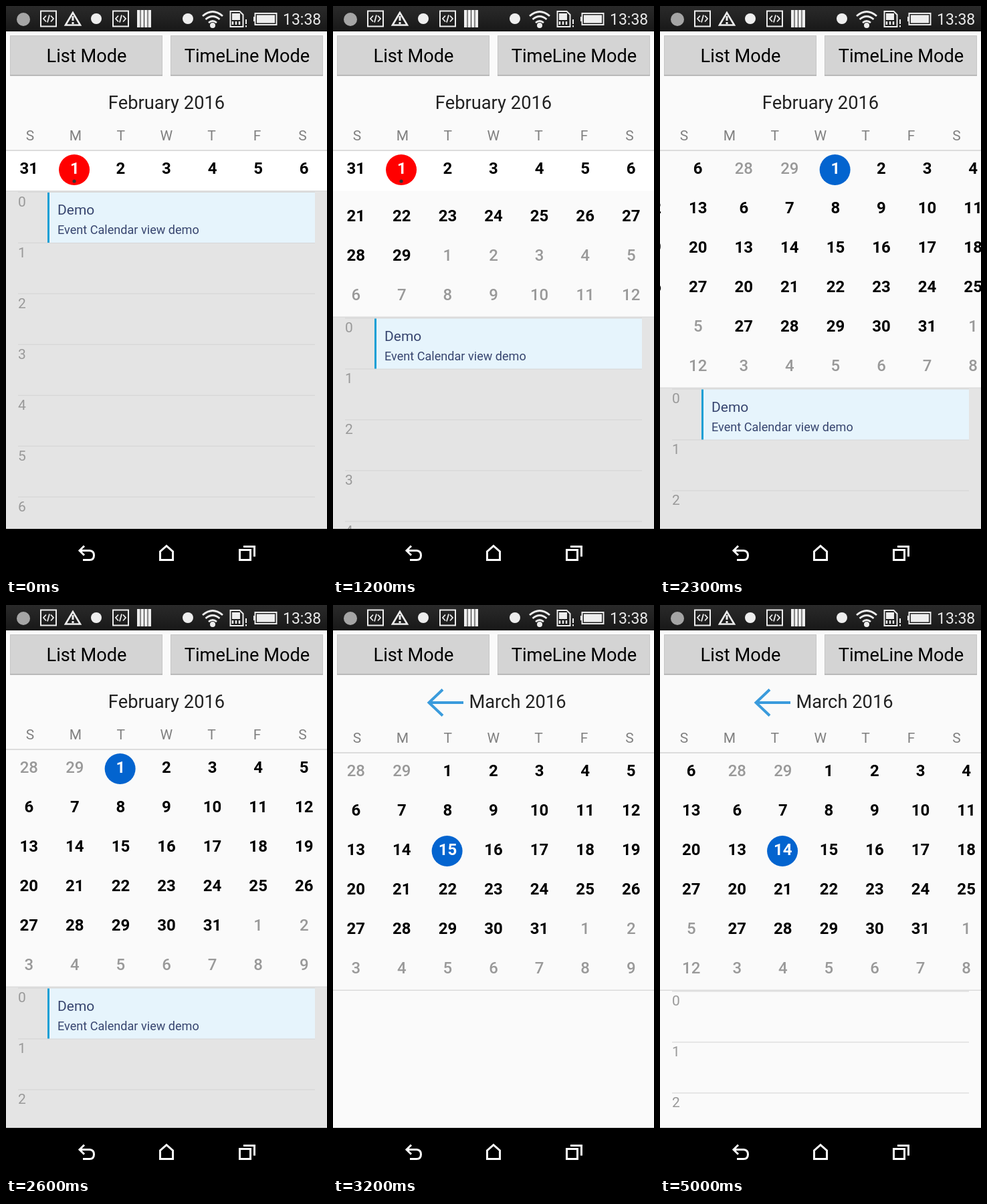
Write an HTML page with a canvas that moves like this. It is 480 px wide and 854 px high and loops after 5.1 s.

```html
<!DOCTYPE html>
<html lang="en">
<head>
<meta charset="utf-8">
<title>Calendar view</title>
<style>
html, body { margin: 0; height: 100%; overflow: hidden; background: #fafafa; }
canvas { display: block; }
</style>
</head>
<body>
<canvas id="stage" width="480" height="854"></canvas>
<script>
const ctx = document.getElementById('stage').getContext('2d');
const LOOP = 5100, STEP = 100, WIDTH = 480, FOOT = 782, COLUMN = WIDTH / 7, ROW = 59, HOUR = 76;
const PAPER = '#fafafa', RULE = '#dcdcdc', WHITE = '#fff', TODAY = '#f00', PICKED = '#0364cf';
const FEBRUARY = { lead: 1, length: 29, before: 31 };
const MARCH = { lead: 2, length: 31, before: 29 };

// Keys are [time, value]; linear in between.
function track(time, keys) {
  const next = keys.findIndex(key => key[0] > time);
  if (next === 0) return keys[0][1];
  if (next < 0) return keys[keys.length - 1][1];
  const [t0, v0] = keys[next - 1], [t1, v1] = keys[next];
  return v0 + (v1 - v0) * (time - t0) / (t1 - t0);
}
const expand = t => track(t, [[900, 0], [1000, 35.5], [1300, 265], [1400, 294.5]]);
const monthShift = t => track(t, [[2000, 480], [2100, 435], [2200, 250], [2300, 91], [2400, 33],
  [2500, 8], [2600, 0], [4800, 0], [4900, 34], [5000, 81]]);

function box(x, y, w, h, color) {
  ctx.fillStyle = color;
  ctx.fillRect(x, y, w, h);
}
function disc(x, y, r, color) {
  ctx.fillStyle = color;
  ctx.beginPath();
  ctx.arc(x, y, r, 0, 7);
  ctx.fill();
}
function stroke(path, color, width) {
  ctx.strokeStyle = color;
  ctx.lineWidth = width;
  ctx.stroke(new Path2D(path));
}
function text(value, x, y, size, color, align = 'center', weight = 400) {
  ctx.font = `${weight} ${size}px Roboto, sans-serif`;
  ctx.textAlign = align;
  ctx.fillStyle = color;
  ctx.fillText(value, x, y);
}
function clipped(x, y, w, h, draw) {
  ctx.save();
  ctx.beginPath();
  ctx.rect(x, y, w, h);
  ctx.clip();
  draw();
  ctx.restore();
}

function statusBar() {
  const shade = ctx.createLinearGradient(0, 0, 0, 38);
  shade.addColorStop(0, '#2a2a2a');
  shade.addColorStop(1, '#181818');
  box(0, 0, WIDTH, 38, shade);
  disc(26, 20, 10, '#a5a5a5');
  for (const x of [52, 160]) {
    stroke(`M${x} 7.500h23v23h-23z`, '#eee', 2);
    stroke(`M${x + 8} 14.500l-4 4.500 4 4.500M${x + 15} 14.500l4 4.500-4 4.500M${x + 13} 13.500l-3 11`, '#eee', 1.8);
  }
  stroke('M100 10L89 28.500H111Z', '#eee', 2.6);
  stroke('M100 15v7M100 24v3', '#eee', 3);
  disc(135, 19, 8, '#eee');
  for (let i = 0; i < 4; i++) box(196 + i * 5.5, 6, 4.5, 26, '#eee');
  disc(272, 19, 8, '#eee');
  disc(309, 29, 4, '#eee');
  stroke('M294 15Q309 2 324 15M298.500 20Q309 11 319.500 20M303 25Q309 20 315 25', '#eee', 2.8);
  stroke('M335.500 8h14l5 5v18h-19z', '#eee', 2);
  box(338, 11, 12, 10, '#eee');
  stroke('M339 23v5M344 23v5M349 23v5', '#eee', 2.5);
  stroke('M359 20v7M359 29v2.500', '#eee', 2);
  stroke('M372.500 11h32v17h-32zM371 16v7', '#eee', 2);
  box(375, 13.5, 27, 12, '#eee');
  text('13:38', 414, 28, 23, '#e8e8e8', 'left');
}

function button(x, label, center) {
  box(x, 44, 228, 60.5, '#a9a9a9');
  box(x, 44, 228, 59, '#c6c6c6');
  box(x + 1, 45, 226, 58, '#d4d4d4');
  text(label, center, 84, 27.2, '#000');
}

function navBar() {
  box(0, FOOT, WIDTH, 72, '#000');
  stroke('M117 807.500L110 814.500L117 821.500M111 814.500H125Q131.500 815 131.500 821.500Q131.500 828.500 125 828.500H115', WHITE, 3);
  stroke('M230.500 828.500V816L240 807.500L249.500 816V828.500Z', WHITE, 3);
  stroke('M349.500 813.500h16v15h-16zM355 808.500h16.500v15', WHITE, 3);
}

function dayCell(value, column, y, color, mark) {
  const x = (column + .5) * COLUMN;
  if (mark) disc(x - .8, y + 3, 23, mark);
  if (mark === TODAY) disc(x - .8, y + 20, 2.6, '#333');
  text(value, x, y + 9, 24, mark ? WHITE : color, 'center', color === '#999' ? 500 : 600);
}

function monthPage(month, shift, top, selected, mark) {
  ctx.save();
  ctx.translate(shift, 0);
  for (let i = 0; i < 42; i++) {
    const day = i - month.lead + 1;
    const inside = day > 0 && day <= month.length;
    const label = day < 1 ? day + month.before : inside ? day : day - month.length;
    dayCell(label, i % 7, top + 26 + Math.floor(i / 7) * ROW, inside ? '#000' : '#999', day === selected && mark);
  }
  ctx.restore();
}

function hours(top, shift, busy) {
  ctx.save();
  ctx.translate(shift, 0);
  if (busy) box(0, top, WIDTH, FOOT - top, '#e4e4e4');
  for (let i = 0; i < 7; i++) {
    const y = top + i * HOUR;
    box(18, y + .7, 444, 1.3, busy ? '#d7d7d7' : RULE);
    text(i, 18, y + 22.5, 21, '#999', 'left');
  }
  if (busy) {
    box(62, top + 2, 400, 75, '#e6f4fc');
    box(62, top + 2, 3, 75, '#109fd5');
    text('Demo', 77, top + 35, 21, '#37456f', 'left');
    text('Event Calendar view demo', 77, top + 64, 18.1, '#37456f', 'left');
  }
  ctx.restore();
}

function agenda(t, top) {
  if (t < 2900) hours(top, track(t, [[2600, 0], [2700, -200], [2800, -400], [2900, -480]]), true);
  else if (t >= 4300 && t < 4400) {
    hours(top, -150);
    hours(top, 330);
  } else if (t >= 3400) {
    hours(top, track(t, [[3400, 330], [3500, 130], [3600, 35], [3700, 0]]));
  }
}

function render(t) {
  const inMarch = t >= 2700;
  const head = inMarch ? 221 : 216;
  const open = expand(t);
  const bottom = head + 61 + open;
  const shift = monthShift(t);
  const selected = t < 3100 ? 1 : t < 4300 ? 15 : 14;

  box(0, 0, WIDTH, 854, PAPER);
  button(6, 'List Mode', 120.5);
  button(246, 'TimeLine Mode', 360.5);
  if (inMarch) {
    stroke('M195 146H144M164 126.500L143.500 146L164 165.500', '#3a9bdc', 4);
    text('March 2016', 276, 154, 27.3, '#222');
  } else text('February 2016', 240, 154, 27.3, '#222');
  [...'SMTWTFS'].forEach((letter, i) => text(letter, 36 + i * 67.9, head - 15.5, 21, '#808080'));

  clipped(0, head, WIDTH, bottom - head, () => {
    const top = head + open - 294.5;
    if (shift < 480) monthPage(MARCH, shift, top, selected, PICKED);
    if (shift > 0) monthPage(FEBRUARY, shift - 480, top, inMarch ? 0 : 1, TODAY);
    if (t < 1400) {
      box(0, head, WIDTH, 60.5, WHITE);
      for (let i = 0; i < 7; i++) dayCell(i || 31, i, head + 26, '#000', i === 1 && TODAY);
    }
  });
  clipped(0, bottom, WIDTH, FOOT - bottom, () => agenda(t, bottom));
  box(0, head - 1, WIDTH, 2, RULE);
  box(0, bottom - 1, WIDTH, 1.5, RULE);
  statusBar();
  navBar();
}

function tick() {
  const t = performance.now() % LOOP;
  render(Math.floor(t / STEP) * STEP);
  requestAnimationFrame(tick);
}
tick();
</script>
</body>
</html>
```
